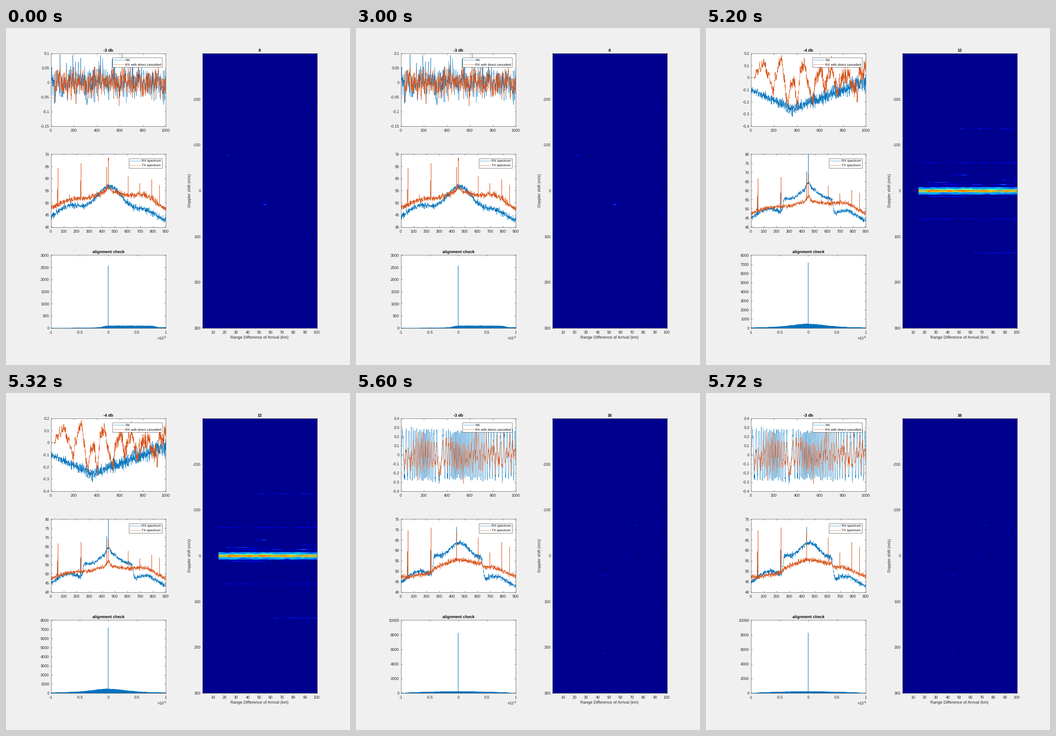
Write a matplotlib script that moves like this. It is 756 px wide and 741 px high and loops after 5.8 s.

```python
import numpy as np
import matplotlib.pyplot as plt
from matplotlib.animation import FuncAnimation
from matplotlib.colors import LinearSegmentedColormap
from matplotlib.patches import Rectangle

W, H = 756, 741
BLUE, RED, INK = "#0072bd", "#d95319", "#262626"
TICK, LEGEND, LABEL = 8.5, 7.4, 9
THIN = 0.58

plt.rcParams.update({
    "font.family": "Liberation Sans", "axes.unicode_minus": False,
    "text.hinting": "none", "font.size": TICK,
    "axes.linewidth": THIN, "axes.edgecolor": INK,
    "xtick.color": INK, "ytick.color": INK, "text.color": INK,
    "axes.titlesize": LABEL, "axes.titleweight": "bold",
    "axes.titlecolor": "black", "axes.titlepad": 4,
})

JET = LinearSegmentedColormap.from_list("jet64", [
    (0, "#00008f"), (0.11, "#0000ff"), (0.365, "#00ffff"),
    (0.62, "#ffff00"), (0.87, "#ff0000"), (1, "#800000")], 256)

T = np.arange(1001)
BINS = np.arange(901)
LAG = np.linspace(-1, 1, 1001)
KM, SPEED = np.meshgrid(np.arange(1, 101), np.linspace(-299.5, 299.5, 604))

# Transmitter carriers: bin -> rise above the spectrum in dB
CARRIERS = {56: 20, 237: 19, 437: 12, 606: 11, 697: 6, 790: 11, 852: 11}


def bell(x, centre, width):
    return np.exp(-((x - centre) / width) ** 2)


def plateau(x, lo, hi, soft):
    return (np.tanh((x - lo) / soft) - np.tanh((x - hi) / soft)) / 2


def noise(rng, n, sigma=1.0, width=1, heavy=False):
    raw = rng.laplace(size=n) if heavy else rng.normal(size=n)
    y = np.convolve(raw, np.hanning(width + 2)[1:-1], "same")
    return sigma * y / y.std()


def gated(y):
    return np.where(T < 30, 0, y)


def spectrum(rng, floor, left, dome, width, right, step=0, tip=0,
             carriers=CARRIERS, gain=1.0):
    y = (floor + left * bell(BINS, 150, 150) + dome * bell(BINS, 460, width)
         + right * bell(BINS, 740, 130) + step * plateau(BINS, 252, 645, 9)
         + tip / 5 * bell(BINS, 450, 20) + noise(rng, BINS.size, 0.6))
    for x, rise in carriers.items():
        y[x] += gain * rise
        if x < 300:
            y[x - 5] += gain * rise / 2
    y[449:453] += tip
    return y


def rx_spectrum(rng, *shape, gain=0.6, **extra):
    strong = {x: CARRIERS[x] for x in (56, 237, 437)}
    return spectrum(rng, *shape, carriers=strong, gain=gain, **extra)


def correlation(rng, shape, peak, rough=0.25):
    h = np.clip(shape, 0, None) * (1 - rough * rng.random(LAG.size))
    h[LAG.size // 2] = peak
    return h


def spots(rng, bright, count, sx, sy):
    """A few bright echoes among randomly scattered faint ones."""
    faint = [(rng.uniform(15, 98), rng.uniform(-290, 290),
              rng.uniform(0.02, 0.08)) for _ in range(count)]
    return sum(a * bell(KM, x, sx) * bell(SPEED, v, sy)
               for x, v, a in [(*p, 0.16) for p in bright] + faint)


def band(rng, v, half, level, rough, x0=15, x1=100):
    texture = np.clip(1 + rough * noise(rng, 100, 1, 7), 0, 1.8)
    return level * texture * bell(SPEED, v, half) * (KM >= x0) * (KM <= x1)


def streaks(rng, count, spread, top):
    img = 0
    for _ in range(count):
        x0 = 15 + rng.exponential(14)
        img += band(rng, rng.normal(0, spread), 0.6, rng.uniform(0.04, top),
                    0.7, x0, x0 + rng.uniform(20, 80))
    return img


def weak_signal():
    rng = np.random.default_rng(8)
    common = noise(rng, T.size, 0.018, 3)
    rx = common + noise(rng, T.size, 0.02, 2, True)
    clean = common + noise(rng, T.size, 0.016, 2)
    return dict(
        gain="-3 db", number="8", rx=rx, clean=gated(clean),
        rx_spec=rx_spectrum(rng, 41.5, 7, 15, 160, 5, gain=0),
        tx_spec=spectrum(rng, 46, 4.5, 8.5, 200, 6, tip=11, gain=0.75),
        corr=correlation(rng, 12 + 15 * LAG * (LAG < 0)
                         + 80 * plateau(LAG, -0.1, 0.83, 0.06), 2560),
        img=spots(rng, [(23, -77.5), (54, 30), (55, 30)], 22, 0.9, 1.3),
        y1=(-0.15, 0.1, 0.05), y2=(40, 70, 5), y3=(0, 3000, 500))


def strong_direct():
    rng = np.random.default_rng(10)
    common = noise(rng, T.size, 0.02)
    rx = common + noise(rng, T.size, 0.024, 1, True)
    clean = common + noise(rng, T.size, 0.021)
    img = band(rng, 0, 1.7, 0.88, 0.02) + streaks(rng, 26, 10, 0.17)
    for side in (-1, 1):
        img += band(rng, 2.8 * side, 0.8, 0.5, 0.05)
        img += band(rng, 61.7 * side, 0.7 + 0.3 * side, 0.2, 0.35)
    for v in (4.5, 7.5, 10.5):
        img += band(rng, v, 0.6, 0.22, 0.4)
    return dict(
        gain="-4 db", number="10", rx=rx, clean=gated(clean),
        rx_spec=rx_spectrum(rng, 44, 8, 18, 170, 6, tip=17, gain=0.75),
        tx_spec=spectrum(rng, 46, 4.5, 8, 200, 6, tip=14),
        corr=correlation(rng, 680 * np.exp(-np.abs(LAG / 0.45) ** 1.4),
                         14300, 0.6),
        img=img, y1=(-0.15, 0.15, 0.05), y2=(40, 90, 10),
        y3=(0, 15000, 5000))


def drifting():
    rng = np.random.default_rng(12)
    spread = 0.014 + 0.022 * T / 1000
    rx = (np.interp(T, [0, 360, 1000], [-0.1, -0.26, -0.03])
          + spread * noise(rng, T.size))
    turns = [30, 130, 195, 265, 320, 370, 405, 445, 535, 590, 650, 700, 760,
             820, 920, 1000]
    swing = [0, .12, -.1, .14, -.22, .03, -.22, .17, -.18, .07, -.09, .1,
             -.11, .04, -.1, .12]
    clean = (np.interp(T, turns, swing) + noise(rng, T.size, 0.03, 25)
             + spread * noise(rng, T.size))
    img = band(rng, 0, 1.4, 0.84, 0.03) + streaks(rng, 14, 14, 0.12)
    for side in (-1, 1):
        for k in (1, 2, 3):
            img += band(rng, 2.4 * k * side, 0.9, 0.6 / k ** 0.5, 0.12)
        for k in (1, 2):
            img += band(rng, (74 * k - 12.5) * side, 0.6, 0.08, 0.8,
                        35 * k - 20)
    return dict(
        gain="-4 db", number="12", rx=rx, clean=gated(clean),
        rx_spec=rx_spectrum(rng, 42, 8, 10, 120, 7, step=9, tip=16),
        tx_spec=spectrum(rng, 46, 4, 8, 200, 6, tip=12, gain=0.85),
        corr=correlation(rng, 490 * np.exp(-np.abs(LAG / 0.48) ** 1.5),
                         7170, 0.45),
        img=img, y1=(-0.4, 0.2, 0.1), y2=(40, 80, 5), y3=(0, 8000, 1000))


def wide_band():
    rng = np.random.default_rng(14)
    common = noise(rng, T.size, 0.17, 3)
    rx = common + noise(rng, T.size, 0.18, 3)
    clean = common + noise(rng, T.size, 0.1, 2)
    bright = [(48, 111), (70, -55), (70, -170), (97, 268)]
    return dict(
        gain="-3 db", number="14", rx=rx, clean=gated(clean),
        rx_spec=rx_spectrum(rng, 44, 8.5, 11, 120, 7, step=9),
        tx_spec=spectrum(rng, 46.5, 1, 7, 200, 5, step=1.5, gain=1.05),
        corr=correlation(rng, 205 * (1 - (LAG / 0.92) ** 2), 4560),
        img=spots(rng, bright, 24, 1.5, 0.7),
        y1=(-0.8, 0.8, 0.2), y2=(40, 75, 5), y3=(0, 5000, 1000))


def swept_tone():
    rng = np.random.default_rng(16)
    rate = np.interp(T, [0, 220, 345, 470, 860, 1000],
                     [0.02, 0.1, 0.008, 0.1, 0.03, 0.05])
    phase = 2 * np.pi * np.cumsum(rate) - 0.6
    rx = 0.26 * np.sin(phase) + noise(rng, T.size, 0.02)
    clean = (0.11 * np.sin(phase + 0.4) + noise(rng, T.size, 0.06, 9)
             + noise(rng, T.size, 0.03, 2) - 0.13 * bell(T, 342, 22))
    bright = [(73, -66), (66, 4), (87, 27), (45, 43), (45, 214)]
    return dict(
        gain="-3 db", number="16", rx=rx, clean=gated(clean),
        rx_spec=rx_spectrum(rng, 41.5, 8.5, 11, 120, 6, step=11),
        tx_spec=spectrum(rng, 46.5, 1, 7.5, 200, 4, step=1.5, gain=1.15),
        corr=correlation(rng, 200 * (1 - (LAG / 0.94) ** 2), 8250),
        img=spots(rng, bright, 20, 1.5, 0.7),
        y1=(-0.4, 0.4, 0.1), y2=(40, 75, 5), y3=(0, 10000, 2000))


scenes = [make() for make in (weak_signal, strong_direct, drifting,
                              wide_band, swept_tone)]

fig = plt.figure(figsize=(W / 72, H / 72), dpi=72, facecolor="#f0f0f0")


def panel(left, top, right, bottom, xlim, xticks):
    ax = fig.add_axes([left / W, 1 - bottom / H,
                       (right - left) / W, (bottom - top) / H])
    ax.set_xlim(*xlim)
    ax.set_xticks(xticks, [f"{v:g}" for v in xticks])
    ax.tick_params(direction="in", top=True, right=True, length=2.6,
                   width=THIN)
    ax.tick_params(axis="x", pad=5.5)
    ax.tick_params(axis="y", pad=3.5)
    return ax


def scale(ax, lo, hi, step):
    ticks = np.round(np.arange(lo, hi + step / 2, step), 6) + 0.0
    ax.set_ylim(lo, hi)
    ax.set_yticks(ticks, [f"{v:g}" for v in ticks])


def trace(ax, color):
    return ax.plot([], [], color=color, lw=THIN)[0]


ax_time = panel(98.5, 55.5, 351, 215.5, (0, 1000), range(0, 1001, 200))
ax_spec = panel(98.5, 277.5, 351, 437.5, (0, 900), range(0, 901, 100))
ax_corr = panel(98.5, 499.5, 351, 659.5, (-1, 1), np.linspace(-1, 1, 5))
ax_map = panel(431.5, 55.5, 683.5, 659.5, (0.5, 100.5), range(10, 101, 10))

rx_line, clean_line = trace(ax_time, BLUE), trace(ax_time, RED)
rx_spec_line, tx_spec_line = trace(ax_spec, BLUE), trace(ax_spec, RED)
corr_line = trace(ax_corr, BLUE)
heat = ax_map.imshow(scenes[0]["img"], cmap=JET, vmin=0, vmax=1,
                     aspect="auto", interpolation="nearest",
                     extent=(0.5, 100.5, 300, -300))
scale(ax_map, -200, 300, 100)
ax_map.set_ylim(300, -300)
ax_corr.set_title("alignment check")

# Pixel-space layer for legends and axis captions
page = fig.add_axes([0, 0, 1, 1], zorder=5)
page.set(xlim=(0, W), ylim=(H, 0))
page.axis("off")


def legend(left, top, right, names):
    page.add_patch(Rectangle((left, top), right - left, 21, fc="white",
                             ec=INK, lw=THIN))
    for i, (name, color) in enumerate(zip(names, (BLUE, RED))):
        y = top + 5.5 + 10 * i
        page.plot([left + 2.5, left + 26.5], [y, y], color=color, lw=THIN)
        page.text(left + 28.5, y + 2.8, name, size=LEGEND, color="black")


legend(233.5, 64.5, 342.5, ("RX", "RX with direct cancelled"))
legend(269.5, 286.5, 342.5, ("RX spectrum", "TX spectrum"))
page.text(557, 683, "Range Difference of Arrival (km)", size=LABEL,
          ha="center")
page.text(403.5, 357.5, "Doppler shift (m/s)", size=LABEL, rotation=90,
          ha="center", va="center")
page.text(347, 685, "×10", ha="right")
page.text(347.2, 681.5, "6", size=6.6)


def update(frame):
    s = scenes[max(0, frame - 24)]
    rx_line.set_data(T, s["rx"])
    clean_line.set_data(T, s["clean"])
    rx_spec_line.set_data(BINS, s["rx_spec"])
    tx_spec_line.set_data(BINS, s["tx_spec"])
    corr_line.set_data(np.repeat(LAG, 3),
                       np.outer(s["corr"], [0, 1, 0]).ravel())
    heat.set_data(s["img"])
    scale(ax_time, *s["y1"])
    scale(ax_spec, *s["y2"])
    scale(ax_corr, *s["y3"])
    ax_time.set_title(s["gain"])
    ax_map.set_title(s["number"])


anim = FuncAnimation(fig, update, frames=29, interval=200, repeat=True,
                     repeat_delay=0)
plt.show()
```
